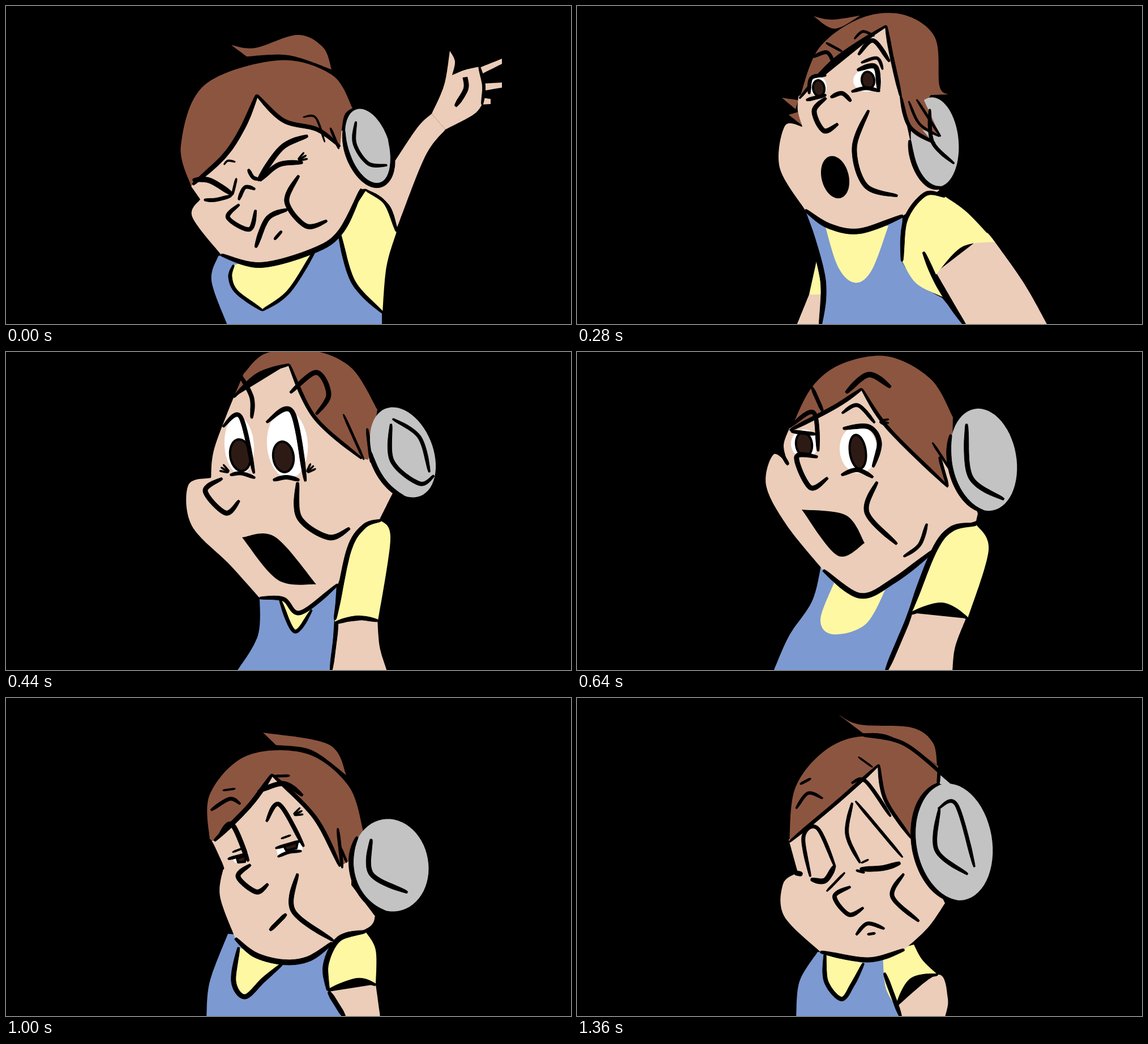
An HTML page that plays this animation: 998x561 px, repeating every 1730 ms.

```html
<!DOCTYPE html>
<html lang="en">
<head>
<meta charset="utf-8">
<title>Dance loop</title>
<style>
html, body { margin: 0; width: 100%; height: 100%; overflow: hidden; background: #000; }
svg { display: block; width: 100%; height: 100%; }
</style>
</head>
<body>
<svg id="stage" viewBox="0 0 998 561"></svg>
<script>
const COLORS = {
  S: '#ebcdb9', H: '#8c5540', B: '#7c99d1', Y: '#fef8a3',
  G: '#c3c3c3', W: '#fff', E: '#2e1a14', K: '#000'
};
const LOOP = 1730, SAMPLES = 90, SHOULDER = [670, 358], SWING = 1.8;

const mix = (a, b, k) => a + (b - a) * k;
const mixPts = (a, b, k) => a.map((p, i) => [mix(p[0], b[i][0], k), mix(p[1], b[i][1], k)]);
const rad = deg => deg * Math.PI / 180;
const clamp = (v, lo, hi) => Math.max(lo, Math.min(hi, v));

function spin([x, y], [ox, oy], angle) {
  const c = Math.cos(angle), s = Math.sin(angle);
  return [ox + (x - ox) * c - (y - oy) * s, oy + (x - ox) * s + (y - oy) * c];
}

// Catmull-Rom curve through a few points
function smooth(run) {
  const out = [], at = i => run[clamp(i, 0, run.length - 1)];
  for (let i = 0; i < run.length - 1; i++) {
    const [a, b, c, d] = [at(i - 1), at(i), at(i + 1), at(i + 2)];
    for (let t = 0; t < 1; t += 1 / 16) {
      out.push([0, 1].map(j => b[j] + t / 2 * (c[j] - a[j] +
        t * (2 * a[j] - 5 * b[j] + 4 * c[j] - d[j] + t * (3 * (b[j] - c[j]) + d[j] - a[j])))));
    }
  }
  return [...out, run[run.length - 1]];
}

// A letter fills the shape; "/" is a corner; a number inks the run that follows it.
function parse(text) {
  return text.split('|').flatMap(piece => {
    const fill = COLORS[piece[0]] && piece[0], all = [], inks = [];
    for (const chunk of (fill ? piece.slice(1) : piece).split(' /')) {
      const [width, ...spots] = chunk.split(' ');
      const run = spots.map(p => p.split(',').map(Number));
      if (all.length) run.unshift(all[all.length - 1]);
      const pts = smooth(run);
      all.push(...pts);
      if (width) inks.push({ paint: width, pts });
    }
    return fill ? [{ paint: fill, pts: all }, ...inks] : inks;
  });
}

function oval(paint, x, y, rx, ry, tilt = 0, from = 0, to = 360) {
  const pts = Array.from({ length: 61 }, (_, i) => {
    const a = rad(mix(from, to, i / 60));
    return spin([x + rx * Math.cos(a), y + ry * Math.sin(a)], [x, y], rad(tilt));
  });
  return { paint, pts };
}

const muff = (x, y, rx, ry, tilt, from, to) =>
  [oval('G', x, y, rx, ry, tilt), oval('8', x, y, rx + 2, ry + 2, tilt, from, to)];

const eye = (x, y, rx, ry, px, py, prx, pry) =>
  [oval('W', x, y, rx, ry, -4), oval('E', px, py, prx, pry, -8)];

const lashes = (x, y, dir) => [-20, 0, 20].flatMap(turn => {
  const [c, s] = [Math.cos(rad(dir + turn)), Math.sin(rad(dir + turn))];
  return parse(`3 ${x + 3 * c},${y + 3 * s} ${x + 19 * c},${y + 19 * s}`);
});

// Open hand, measured from the thumb tip
function hand(x, y, stretch) {
  const finger = ([bx, by, tx, ty]) =>
    `S ${bx},${by - 6} / ${tx},${ty - 5} / ${tx},${ty + 4} / ${bx},${by + 7}`;
  const shape = [
    ...[[52, 36, 92, 19], [56, 64, 92, 61], [53, 88, 72, 90]].map(finger),
    'S -32,111 -10,60 0,0 / 9,19 4,43 / 26,34 52,28 / 60,62 57,95 / 41,113 -8,139',
    '5 52,28 60,62 57,95', '8> 27,47 28,68 10,98'
  ].join('|');
  return parse(shape.replace(/(-?\d+),(-?\d+)/g, (_, a, b) => `${x + a * stretch},${y + +b}`));
}

const raised = {
  dress: 'B 375,441 363,485 391,563 / 664,563 / 664,541 / 588,398 / 375,441',
  collar: 'Y6 402,457 396,478 408,505 453,537 /6 500,503 548,427 / 470,440',
  arm: 'S 635,322 / 686,275 / 727,214 752,190 / 776,218 / 740,266 691,390 / 676,350 635,322',
  hand: hand(784, 79, 1),
  sleeve: 'Y 588,398 / 636,325 /5 670,348 690,398 / 672,460 665,541 /7 613,486 588,398',
  face: 'S 327,318 / 343,341 / 329,372 380,439 /9 450,457 545,431 592,397 628,323 / 684,320 / 640,240 / 443,155',
  tuft: 'H 398,69 440,74 515,51 560,73 575,112 / 500,87 425,89 / 398,69',
  hair: 'H 327,318 309,245 350,140 480,96 575,121 612,180 / 597,195 590,248 /7 550,218 490,202 443,157 /8 418,215 385,265 330,315',
  lock: '3 525,196 547,197 563,240|4 573,215 588,252',
  muff: muff(640, 248, 37, 69, -18, 215, 0),
  ring: '6 618,204 616,243 640,278 673,281',
  browR: '9 533,229 487,250 445,308',
  lidR: '8 448,308 482,280 524,276',
  lash: lashes(514, 273, -30),
  frown: '6 428,288 436,302 447,306|4 407,304 400,333',
  browL: '9 330,307 360,308 401,333',
  lidL: '6 398,335 370,342 350,342',
  crease: '3 385,280 392,273 405,275',
  bridge: '6 411,342 422,320 440,323',
  nose: '7 412,350 392,373 430,394 441,360',
  cheek: '8 517,299 496,345 530,388 567,379',
  mouth: '8 497,359 462,375 441,426',
  dimple: '5 487,397 474,412'
};

const dab = {
  dress: 'B 377,452 371,500 412,563 / 664,563 / 640,530 / 580,395 / 555,410 / 377,435',
  collar: 'Y7 423,442 440,508 485,528 535,505 553,432 / 490,440',
  arm: 'S 628,325 / 705,262 / 728,212 756,180 / 803,188 / 795,210 / 745,257 692,387 / 675,350 628,325',
  hand: hand(787, 72, 1.22),
  sleeve: 'Y 583,390 / 633,324 /6 668,348 689,395 / 665,475 656,551 /8 608,465 582,390',
  face: 'S 334,318 306,355 330,420 377,446 /9 400,441 430,442 500,456 562,418 628,325 / 690,300 / 620,200 / 484,168',
  hair: 'H 334,318 342,235 405,145 510,105 585,135 618,190 / 602,262 / 584,246 / 590,286 /7 550,238 483,170 /7 425,258 336,317',
  lock: '4 510,171 540,178 556,212|5 584,247 602,288',
  muff: muff(654, 251, 49, 62, -12, 215, -50),
  ring: '8 634,206 630,245 670,284',
  browR: '9 522,210 470,245 440,328',
  lidR: '8 452,315 475,294 505,288',
  lash: lashes(498, 289, -45),
  frown: '7 418,303 428,320 440,328|4 385,374 403,412',
  browL: '9 340,309 385,349 405,337 395,311',
  lidL: '4 347,330 362,345',
  crease: '4 392,282 400,271 413,275|4 331,296 354,291',
  nose: '8 440,362 405,375 428,411 456,388',
  cheek: '8 512,291 503,335 545,367 580,331',
  mouth: '8 503,341 482,405 442,430'
};

const gasp = {
  sleeveL: 'Y 423,450 / 410,509 / 435,509',
  armL: 'S 410,509 388,563 / 430,563 / 434,509',
  dress: 'B9 400,360 434,480 430,563 / 685,563 / 645,515 / 600,488 573,450 / 575,370',
  collar: 'Y 435,375 460,458 490,488 520,467 550,388',
  tuft: 'H 418,18 450,24 500,17 / 455,40 418,18',
  wisp: 'H 362,162 391,166 / 386,182 / 362,162|H 374,192 390,187 / 397,210 / 374,192',
  face: 'S 391,160 390,185 398,213 / 367,212 358,285 403,360 /9 445,388 500,397 576,370 / 640,325 / 588,235 / 572,160 / 546,35',
  arm: 'S 725,400 / 738,416 790,490 831,563 / 688,563 / 634,470',
  sleeve: 'Y7 574,450 580,378 615,332 650,336 / 690,365 738,416 / 680,425 634,474 / 650,515 / 600,490 574,450',
  side: '8 612,434 640,495 685,563',
  hair: 'H 393,163 427,75 500,22 575,15 632,55 640,140 655,156 / 625,157 / 610,180 / 572,160 /6 556,90 546,35 /6 455,95 393,163',
  muff: muff(632, 240, 42, 79, -5, 185, 85),
  wave: 'H 572,160 590,220 630,242 / 610,218 / 642,230 / 610,160',
  lock: '6 572,160 588,213 632,242|4 586,168 605,208 640,230|4 600,165 642,230',
  ring: '6 623,182 628,240 666,278',
  eyeL: eye(426, 142, 15, 18, 427, 145, 10, 14),
  eyeR: eye(513, 131, 25, 20, 514, 131, 11, 15),
  lidR: '8 495,113 527,107 533,148',
  lowR: '6 485,151 510,145 535,150',
  browR: '7 497,86 523,61 552,98',
  crease: '5 502,100 530,92 540,112|4 490,58 505,45 525,53|4 440,65 468,80',
  lidL: '6 410,155 414,127 440,122',
  lowL: '6 405,166 440,157',
  browL: '6 417,90 442,82 455,105',
  bridge: '7 448,161 468,154 484,168',
  nose: '8 440,162 419,185 436,220 461,208',
  cheek: '8 515,184 490,250 510,317 566,335',
  gape: [oval('K', 456, 302, 24, 38, -14)]
};

const shout = {
  dress: 'B 448,430 445,500 408,563 / 574,563 / 584,410 / 490,425',
  collar: 'Y6 484,437 510,493 540,455',
  arm: 'S6 585,478 574,563 / 673,563 / 660,520 656,470',
  face: 'S 402,80 368,170 362,222 / 322,235 328,306 395,375 448,434 /7 490,436 520,460 586,410 / 625,320 660,295 / 685,245 / 640,150 / 500,20',
  sleeve: 'Y8 581,472 605,352 632,308 662,297 / 679,330 657,474 /7 620,469 581,478',
  hair: 'H 402,80 / 420,38 / 460,2 540,-3 610,28 656,102 / 640,190 / 628,188 /6 545,115 500,22 /6 445,40 402,80',
  lock: '4 596,110 632,190|5 638,135 645,195',
  muff: muff(701, 177, 53, 83, -22, 195, 120),
  ring: '7 680,127 682,192 730,232 756,218|6 683,118 730,150 748,212',
  eyeL: eye(412, 165, 26, 51, 414, 182, 18, 28),
  eyeR: eye(497, 163, 36, 60, 490, 185, 18, 27),
  lidL: '7 383,132 414,114 438,214',
  lidR: '8 460,124 505,105 529,228',
  lowL: '6 396,217 415,214 440,222',
  lowR: '7 472,226 495,221 518,226',
  lash: [...lashes(530, 214, -45), ...lashes(396, 213, -150)],
  browL: '7 412,38 434,80 434,117',
  browR: '8 502,72 548,36 570,75 548,110',
  nose: '8 382,223 352,245 388,284 412,262',
  cheek: '9 515,230 518,292 570,327 607,311',
  gape: 'K 417,327 475,326 548,410 / 480,402 417,327'
};

const yell = {
  dress: 'B 431,378 415,440 375,500 347,563 / 546,563 / 622,358',
  collar: 'Y 455,405 430,472 452,498 510,480 548,412',
  arm: 'S8 590,460 546,563 / 663,563 / 668,520 687,470',
  face: 'S 375,135 365,165 373,198 / 347,181 334,235 370,305 435,385 /9 500,430 560,403 630,350 / 665,315 705,298 / 708,285 / 660,150 / 505,65',
  sleeve: 'Y9 588,460 630,352 662,312 705,304 / 727,350 690,470 /7 645,446 588,462',
  hair: 'H 376,140 415,62 470,20 550,8 625,48 664,115 / 662,212 / 645,188 / 655,238 /6 550,135 503,65 /7 455,97 376,138',
  lock: '4 628,160 662,212|5 640,185 655,237',
  muff: muff(718, 190, 58, 91, -10, 215, 105),
  ring: '8 688,127 695,220 754,260',
  eyeL: eye(402, 162, 24, 25, 401, 163, 14, 21),
  eyeR: eye(497, 172, 33, 42, 496, 176, 14, 30),
  lidL: '6 378,140 422,145',
  lidR: '8 470,135 515,132 534,160 523,203',
  lowR: '7 467,217 495,208 523,221',
  crease: '6 468,108 496,94 526,125',
  lash: lashes(532, 122, 10),
  browL: '7 378,130 418,107 426,175|6 415,62 434,105',
  browR: '9 475,72 515,40 554,62',
  nose: 'S8 425,185 388,185 412,239 443,222',
  temple: '6 362,180 373,199',
  cheek: '8 530,229 512,283 565,339',
  dimple: '6 618,303 605,340 577,361',
  gape: 'K 397,278 475,288 508,337 / 460,359 397,278'
};

const sulk = {
  dress: 'B 392,416 360,500 354,563 / 598,563 / 570,520 / 572,430',
  collar: 'Y8 411,440 402,500 422,527 455,497 488,469',
  arm: 'S8 570,518 598,563 / 661,563 / 653,505',
  face: 'S 360,255 / 384,300 / 378,350 405,424 /9 440,453 490,466 535,460 576,432 / 640,405 652,385 / 610,330 / 610,250 / 470,135',
  sleeve: 'Y9 569,516 565,470 588,425 635,412 / 653,445 653,506 /7 620,498 569,516',
  tuft: 'H 454,61 570,82 601,136 / 540,92 477,83 / 454,61',
  hair: 'H 360,252 360,170 425,102 530,98 605,155 631,235 / 605,288 / 590,297 /7 545,210 470,135 /8 430,190 368,252',
  lock: '5 586,230 594,300|4 590,262 602,290',
  muff: muff(679, 295, 67, 82, -10, 225, 110),
  ring: '8 645,249 645,310 709,343',
  whiteL: 'W 400,283 / 428,274 / 428,288 / 405,291',
  pupilL: 'E 408,283 / 424,278 / 422,289 / 410,290',
  whiteR: 'W 477,263 / 521,252 / 524,268 / 480,278',
  pupilR: 'E 490,260 / 515,255 / 513,265 / 495,269',
  lidR: '5 476,265 521,252|3 486,248 503,242',
  lowR: '5 480,280 500,272 522,270',
  lidL: '5 392,284 426,275|3 400,272 421,264',
  crease: '7 460,218 483,188 526,262|8 378,240 400,224 428,288|3 383,163 405,160|4 472,138 501,137',
  lash: lashes(506, 207, -25),
  browL: '6 362,198 395,178 414,187',
  browR: '8 445,165 490,151 524,172',
  nose: '8 432,294 410,315 442,342 463,328',
  cheek: '8 515,310 507,375 578,428',
  mouth: '7 495,381 466,410',
  temple: '5 360,250 384,302'
};

const doze = {
  dress: 'B 425,448 393,500 387,563 / 572,563 / 540,450',
  collar: 'Y7 438,450 440,500 467,531 487,505 506,468',
  arm: 'S 564,545 / 637,488 655,530 650,563 / 572,563',
  sleeve: 'Y 540,450 / 595,435 / 610,462 637,488 /6 590,498 564,545 / 545,510 540,450',
  side: '7 543,485 572,563',
  face: 'S 374,250 390,308 / 364,328 366,385 430,448 /8 515,462 578,444 / 620,405 650,362 / 590,240 / 533,118',
  tuft: 'H 463,30 500,47 590,52 628,78 636,118 / 555,68 505,62 / 463,30',
  hair: 'H 375,254 385,160 435,95 500,68 575,82 638,120 / 637,153 / 598,195 / 590,247 /6 545,180 533,118 /6 460,183 375,254',
  band: 'G 640,125 / 664,153 / 640,152',
  strap: '6 505,66 580,82 670,157|5 640,122 638,153',
  muff: muff(665, 254, 68, 104, -10, 265, 100),
  ring: '7 640,195 635,268 690,311|6 638,195 670,188 702,298',
  browR: '6 485,150 510,147 554,209',
  browL: '5 387,195 408,168 434,177|4 394,152 413,142|3 497,104 522,122',
  crease: '6 486,185 477,240 500,291|5 492,182 575,281|6 412,315 400,245 425,230 456,298',
  lidL: '9 413,320 438,322 455,296',
  lidR: '9 500,302 540,300 571,291',
  lash: '3 502,291 515,285|4 493,304 508,308|4 441,341 473,308',
  nose: '7 483,333 455,350 480,382 506,370',
  cheek: '7 577,310 557,350 604,394',
  mouth: '6 493,418 513,398 543,407',
  dimple: '4 513,417 527,415',
  temple: '8 384,308 398,311'
};

const models = [raised, dab, gasp, shout, yell, sulk, doze].map(pose =>
  Object.fromEntries(Object.entries(pose).map(([id, part]) =>
    [id, typeof part === 'string' ? parse(part) : part])));

function lengths(pts) {
  let sum = 0;
  return pts.map((p, i) => sum += i ? Math.hypot(p[0] - pts[i - 1][0], p[1] - pts[i - 1][1]) : 0);
}

function resample(pts) {
  const len = lengths(pts), total = len[len.length - 1], out = [];
  for (let i = 0, j = 1; i < SAMPLES; i++) {
    const want = total * i / (SAMPLES - 1);
    while (j < pts.length - 1 && len[j] < want) j++;
    const k = (want - len[j - 1]) / (len[j] - len[j - 1] || 1);
    out.push(mixPts([pts[j - 1]], [pts[j]], k)[0]);
  }
  return out;
}

// Outline of a brush stroke that thins at its ends; ">" thins only the far end
function ribbon(pts, paint) {
  const w = parseFloat(paint), len = lengths(pts), total = len[len.length - 1];
  const thin = u => 0.4 + 0.6 * Math.sqrt(clamp(u / 0.2, 0, 1));
  const left = [], right = [];
  pts.forEach((p, i) => {
    const a = pts[Math.max(0, i - 2)], b = pts[Math.min(pts.length - 1, i + 2)];
    const dx = b[0] - a[0], dy = b[1] - a[1], d = Math.hypot(dx, dy) || 1, u = len[i] / total;
    const h = w / 2 * thin(1 - u) * (paint.endsWith('>') ? 1 : thin(u));
    left.push([p[0] - dy / d * h, p[1] + dx / d * h]);
    right.unshift([p[0] + dy / d * h, p[1] - dx / d * h]);
  });
  return left.concat(right);
}

function draw({ paint, pts }) {
  const color = COLORS[paint];
  const edge = paint === 'E' ? 4 : color ? 0 : 1;
  const d = (color ? pts : ribbon(pts, paint)).map(p => p.map(v => v.toFixed(1)).join(' ')).join('L');
  return `<path d="M${d}Z" fill="${color || '#000'}" stroke="#000" stroke-width="${edge}" stroke-linejoin="round"/>`;
}

function center(model) {
  const pts = resample(model.face[0].pts);
  return [0, 1].map(j => pts.reduce((s, p) => s + p[j], 0) / pts.length);
}

// Parts morph when both poses have them; the rest ride along with the head.
function blend(pos) {
  const i = Math.floor(pos + 1e-6), k = pos - i;
  const from = models[i], to = models[i + 1] || from;
  const [near, far, q] = k < 0.5 ? [from, to, k] : [to, from, 1 - k];
  const home = center(near), away = center(far);
  const shift = [0, 1].map(j => (away[j] - home[j]) * q);
  const dropping = from.hand && !to.hand;
  const list = Object.entries(near).flatMap(([id, strokes]) => {
    if (dropping && (id === 'arm' || id === 'hand')) {
      const arm = id === 'hand' ? from.hand : near.hand ? from.arm : [...from.arm, ...from.hand];
      return arm.map(({ paint, pts }) =>
        ({ paint, pts: pts.map(p => spin(p, SHOULDER, SWING * k)) }));
    }
    return strokes.map(({ paint, pts }, n) => {
      const mate = far[id] && far[id][n];
      if (q < 1e-3) return { paint, pts };
      return { paint, pts: mate ? mixPts(resample(pts), resample(mate.pts), q)
        : pts.map(([x, y]) => [x + shift[0], y + shift[1]]) };
    });
  });
  return list.map(draw).join('');
}

// Pose position over time: quick steps, a pause, then slow ones
function poseAt(t) {
  if (t < 400) return Math.max(0, Math.floor(t / 40) - 1) / 3;
  if (t < 440) return 8 / 3;
  if (t < 640) return t < 520 ? 3 : 3.5;
  return Math.min(6, 4 + Math.floor((t - 640) / 120) / 3);
}

const stage = document.getElementById('stage');
const origin = performance.now(), cels = {};
let shown = -1;

function tick() {
  const pos = poseAt((performance.now() - origin) % LOOP);
  if (pos !== shown) {
    shown = pos;
    stage.innerHTML = cels[pos] = cels[pos] || blend(pos);
  }
  requestAnimationFrame(tick);
}
tick();
</script>
</body>
</html>
```
